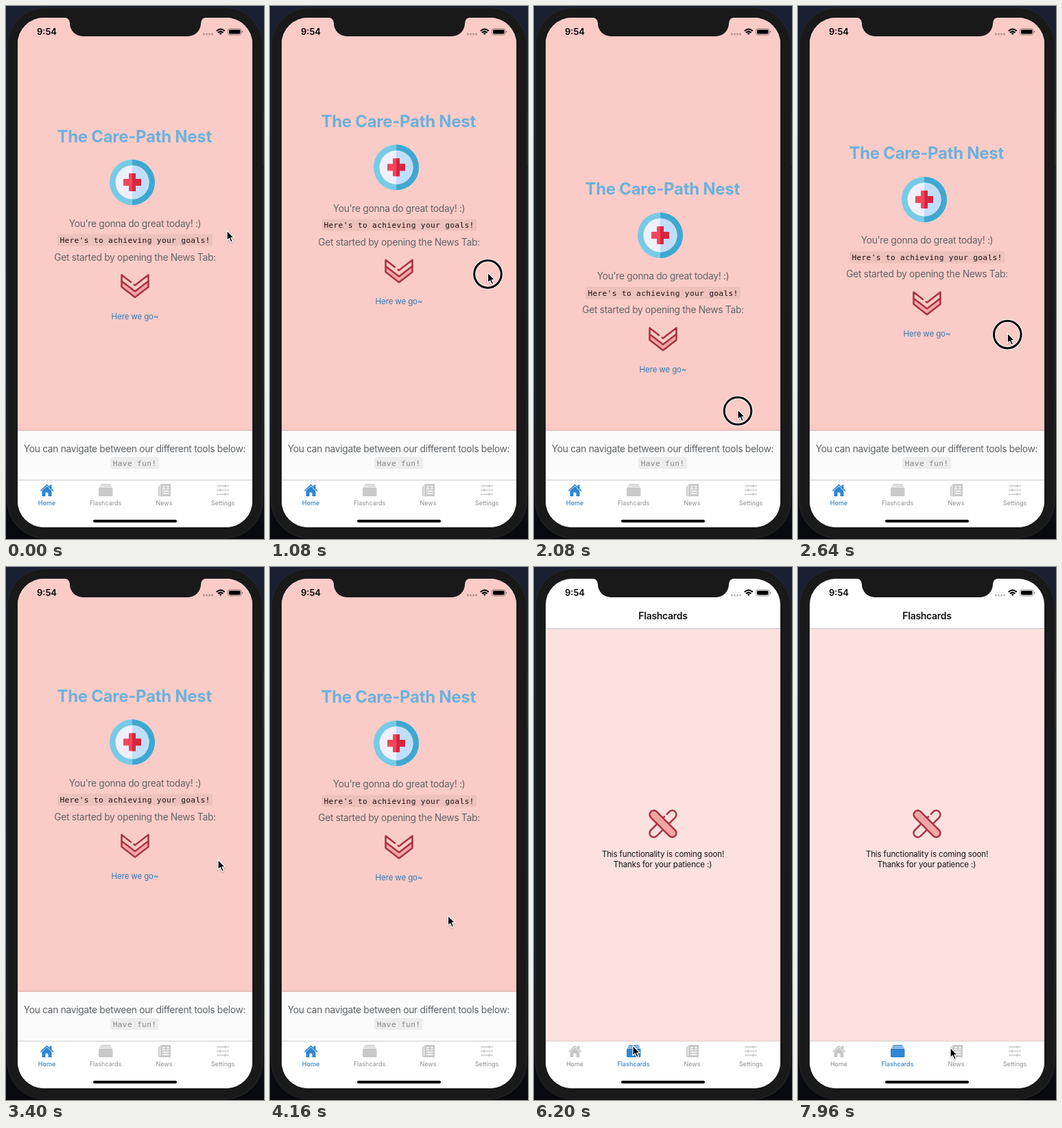
Write an HTML page that moves like this. It is 376 px wide and 774 px high and loops after 8000 ms.

```html
<!DOCTYPE html>
<html lang="en">
<head>
<meta charset="utf-8">
<title>Study app</title>
<style>
html, body { margin: 0; width: 100%; height: 100%; overflow: hidden; background: #11151f; }
svg { display: block; width: 376px; height: 774px; }
text { font-family: Inter, Roboto, sans-serif; text-anchor: middle; }
.body { font-size: 13.8px; letter-spacing: -.022em; fill: #606468; }
.small { font-size: 11.5px; letter-spacing: -.01em; }
.mono { font: 11.2px "DejaVu Sans Mono", "Noto Sans Mono", monospace; letter-spacing: .03em; }
.pill { fill: #000; fill-opacity: .055; }
.line { fill: none; stroke: #a83342; stroke-width: 2.5; stroke-linecap: round; stroke-linejoin: round; }
.tab { color: #c9c9c9; }
.tab text { font-size: 9px; fill: #8e8e93; }
.tab.on { color: #2f86d2; }
.tab.on text { fill: #2f86d2; font-weight: 500; }
</style>
</head>
<body>
<svg viewBox="0 0 376 774">
  <defs>
    <linearGradient id="night" x2="0" y2="1">
      <stop stop-color="#1a2032"/><stop offset=".7" stop-color="#121a2e"/><stop offset="1" stop-color="#08090d"/>
    </linearGradient>
    <clipPath id="screen"><rect x="17" y="17" width="342" height="740" rx="38"/></clipPath>
    <filter id="shade" x="-10%" y="-20%" width="120%" height="140%">
      <feDropShadow dx="0" dy="-1" stdDeviation="1.5" flood-opacity=".14"/>
    </filter>
    <filter id="soft" x="-50%" y="-50%" width="200%" height="200%">
      <feDropShadow dx="0" dy="1" stdDeviation="1" flood-opacity=".3"/>
    </filter>
  </defs>

  <rect width="376" height="774" fill="url(#night)"/>
  <rect x="372" y="153" width="4" height="80" rx="1" fill="#26272a"/>
  <rect x="2" y="2.5" width="372" height="770" rx="54" fill="#191919" stroke="#28292c"/>

  <g clip-path="url(#screen)">
    <rect x="17" y="17" width="342" height="740" fill="#fff"/>

    <g id="home">
      <rect x="17" y="17" width="342" height="671" fill="#fbccc7"/>
      <g id="scroll">
        <text x="187.2" y="197.5" font-size="24" font-weight="700" letter-spacing="-.3" fill="#6cb1dc">The Care-Path Nest</text>
        <circle cx="184" cy="256" r="33" fill="#76cbe8"/>
        <path d="M184 223a33 33 0 0 1 0 66z" fill="#3fa8d0"/>
        <circle cx="184" cy="256" r="24.500" fill="#eff0fb"/>
        <path d="M184 231.500a24.500 24.500 0 0 1 0 49z" fill="#c0defc"/>
        <path d="M179.500 243.500h9v8h8v9h-8v8h-9v-8h-8v-9h8z" fill="#f2475c" stroke="#f2475c" stroke-linejoin="round"/>
        <path d="M184 243h4.500q.5 0 .5.500v7.500h7q1 0 1 1v8q0 1-1 1h-7v7.500q0 .5-.5.500H184z" fill="#d8243f"/>
        <text class="body" x="188" y="320.500">You're gonna do great today! :)</text>
        <rect class="pill" x="75" y="331" width="226" height="17.500" rx="3"/>
        <text class="mono" x="188" y="344" fill="#1a1012">Here's to achieving your goals!</text>
        <text class="body" x="188" y="369.500">Get started by opening the News Tab:</text>
        <path class="line" style="fill:#f3a5a6" d="M168.500 399.500 188 414.500 207.500 399.500V408L188 423 168.500 408z"/>
        <path class="line" d="M168.500 399V390.500L182 401M207.500 399V390.500L188 405.500 186.500 404.500"/>
        <text class="small" x="188" y="455" fill="#2e78b7">Here we go~</text>
      </g>
      <rect x="17" y="617" width="342" height="72" fill="#fbfbfb" filter="url(#shade)"/>
      <text class="body" x="187.400" y="647.500">You can navigate between our different tools below:</text>
      <rect class="pill" x="152" y="655" width="71" height="17" rx="3"/>
      <text class="mono" x="187.500" y="668" fill="#85878a">Have fun!</text>
    </g>

    <g id="cards">
      <rect x="17" y="89" width="342" height="600" fill="#fde1de"/>
      <path d="M17 89.500H359" stroke="#c8c4c7"/>
      <text x="188" y="76" font-size="14" font-weight="600" letter-spacing="-.28" fill="#151515">Flashcards</text>
      <g transform="translate(188 373)">
        <path class="line" transform="rotate(-45)" d="M14-6H19A6 6 0 0 1 19 6H-19A6 6 0 0 1-19-6H9"/>
        <rect class="line" style="fill:#f3a5a6" transform="rotate(45)" x="-25" y="-6" width="50" height="12" rx="6"/>
      </g>
      <text class="small" x="188" y="421" fill="#111">This functionality is coming soon!</text>
      <text class="small" x="187.500" y="435.500" fill="#111">Thanks for your patience :)</text>
    </g>

    <rect x="17" y="688" width="342" height="69" fill="#fff"/>
    <path d="M17 688.500H359" stroke="#cfcfd2"/>

    <g class="tab">
      <g fill="currentColor">
        <path d="M50 703.500 59.500 694.500 63.500 698V695.500H66.500V701L69.500 703.500 68.500 704.800 59.500 696.700 51 704.800z"/>
        <path d="M52.500 704 59.500 697.500 66.500 704V712H61.500V706.500H57.500V712H52.500z"/>
      </g>
      <text x="59.500" y="724.500">Home</text>
    </g>
    <g class="tab">
      <g fill="currentColor">
        <rect x="138" y="694" width="14.500" height="1.400" rx=".7"/>
        <rect x="136.500" y="696.500" width="17.500" height="1.500" rx=".7"/>
        <rect x="135" y="699" width="20.500" height="13" rx="1.800"/>
      </g>
      <text x="145" y="724.500">Flashcards</text>
    </g>
    <g class="tab">
      <path fill="currentColor" d="M225 694H240V710.500Q240 712 238.500 712H224Q222 712 222 710V696.500H224V710H225z"/>
      <path d="M228 698h4M228 701h4M234 698h3.500M234 701h3.500M228 704.500h9.500M228 708h9.500" stroke="#fff" stroke-width="1.400"/>
      <text x="230.500" y="724.500">News</text>
    </g>
    <g class="tab">
      <path d="M307 697H325M307 703H325M307 709H325" stroke="currentColor" stroke-width="1.300"/>
      <path d="M319.500 696v2M312 702v2M319.500 708v2" stroke="currentColor" stroke-width="2.200" stroke-linecap="round"/>
      <text x="316" y="724.500">Settings</text>
    </g>
    <rect x="127" y="746" width="122" height="4" rx="2"/>
  </g>

  <path d="M84 16.500Q93 17 93 25A19 19 0 0 0 112 44H265A19 19 0 0 0 284 25Q284 17 293 16.500z" fill="#191919"/>
  <text x="59.500" y="42" font-size="13" font-weight="600">9:54</text>
  <path d="M288.300 40.800H301" stroke="#000" stroke-opacity=".28" stroke-width="3.200" stroke-linecap="round" stroke-dasharray="0 4.100"/>
  <g fill="none" stroke="#000" stroke-width="2.200">
    <path d="M306.800 36.300Q312.700 30.800 318.600 36.300M309 38.700Q312.700 35.400 316.400 38.700"/>
    <path d="M310.700 39.700Q312.700 38.200 314.700 39.700L312.700 42z" fill="#000" stroke="none"/>
    <rect x="323.500" y="33" width="19.500" height="9" rx="2.700" stroke-width=".9" stroke-opacity=".45"/>
  </g>
  <rect x="325" y="34.500" width="16.500" height="6" rx="1.400"/>
  <path d="M344 36v3q1.300-.4 1.300-1.500T344 36" fill-opacity=".45"/>

  <g id="pointer">
    <g id="ring" fill="none">
      <circle cy="2" r="19.800" stroke="#fff" stroke-opacity=".85" stroke-width="5"/>
      <circle cy="2" r="19.800" stroke="#000" stroke-width="3"/>
    </g>
    <path d="M0 0V14.500L3.300 11.500 5.700 17 8.300 15.900 5.900 10.500H10.300z" stroke="#fff" stroke-width="1.200" stroke-linejoin="round" filter="url(#soft)"/>
  </g>
</svg>

<script>
const LOOP = 8000, GRAB = 900, RELEASE = 3380, TAP = 5900, SWITCH = 5980;
const GRAB_Y = 428, VIEW = 672;
// time, x, y of the pointer tip
const path = [
  [0, 322, 326], [450, 328, 370], [840, 316, 428], [920, 316, 428],
  [1500, 324, 200], [1570, 324, 200], [2070, 297, 586], [2130, 297, 586],
  [2950, 309, 425], [3650, 309, 425], [4950, 161, 667], [5150, 161, 667],
  [5750, 144, 695], [6750, 144, 695], [7750, 222, 698], [LOOP, 222, 698]
];
const $ = id => document.getElementById(id);
const tabs = document.querySelectorAll('.tab');
const show = (id, on) => $(id).style.display = on ? '' : 'none';

function pointerAt(t) {
  const i = path.findIndex(p => p[0] > t);
  const a = path[i - 1], b = path[i];
  const u = (1 - Math.cos(Math.PI * (t - a[0]) / (b[0] - a[0]))) / 2;
  return [a[1] + (b[1] - a[1]) * u, a[2] + (b[2] - a[2]) * u];
}

// Overscroll resistance: the further the pull, the less it moves
function rubber(pull) {
  const d = Math.abs(pull) * .55;
  return Math.sign(pull) * d / (d / VIEW + 1);
}

function scrollAt(t) {
  if (t < GRAB) return 0;
  const settle = t > RELEASE + 20 ? Math.exp((RELEASE + 20 - t) / 90) : 1;
  return rubber(pointerAt(Math.min(t, RELEASE))[1] - GRAB_Y) * settle;
}

function draw(now) {
  const t = now % LOOP, onCards = t >= SWITCH;
  show('home', !onCards);
  show('cards', onCards);
  tabs.forEach((tab, i) => tab.classList.toggle('on', i === +onCards));
  show('ring', t >= GRAB && t < RELEASE || t >= TAP && t < TAP + 140);
  $('scroll').setAttribute('transform', `translate(0 ${scrollAt(t)})`);
  $('pointer').setAttribute('transform', `translate(${pointerAt(t)})`);
}

const start = performance.now();
function tick() {
  draw(performance.now() - start);
  requestAnimationFrame(tick);
}
tick();
</script>
</body>
</html>
```
